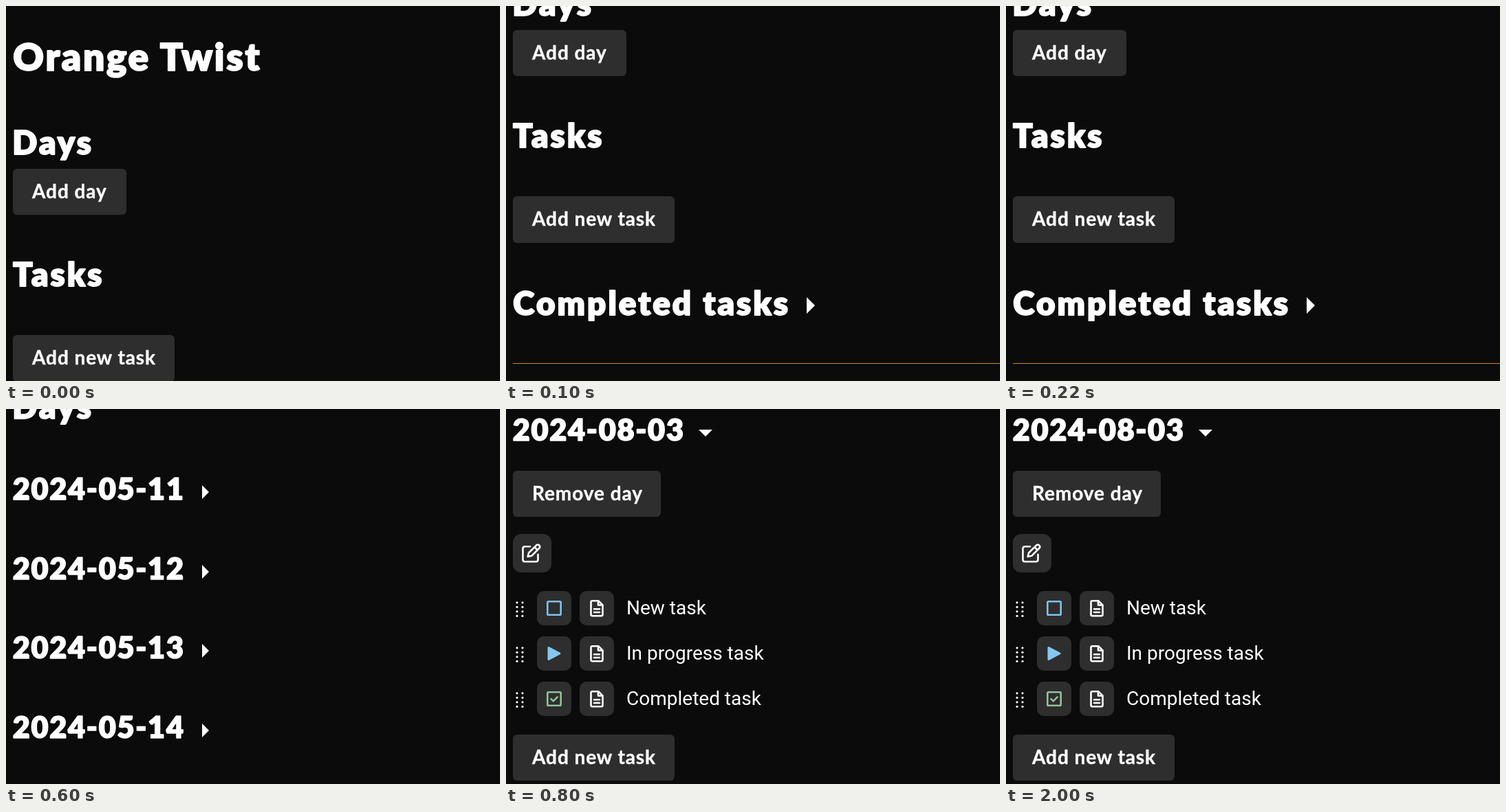
Recreate the animation shown at these times as an HTML page. Size 718 by 546 pixels, loop 2800 ms.

```html
<!DOCTYPE html>
<html lang="en">
<head>
<meta charset="utf-8">
<title>Task list</title>
<style>
  html, body { margin: 0; width: 100%; height: 100%; overflow: hidden; background: #0b0b0b; }
  svg { display: block; width: 718px; height: 546px; }
  text { fill: #fff; white-space: pre; }
  .h1, .h2, .h3 {
    font-family: Lato, sans-serif; font-weight: 900;
    stroke: #fff; stroke-width: 1.9px; stroke-linejoin: round;
  }
  .h1 { font-size: 55px; letter-spacing: .049em; }
  .h2 { font-size: 47.5px; letter-spacing: .064em; }
  .h3 { font-size: 43.2px; letter-spacing: .04em; stroke-width: 1.6px; }
  .label {
    font: 700 28px Lato, sans-serif; letter-spacing: .033em;
    stroke: #fff; stroke-width: .4px; stroke-linejoin: round;
  }
  .task { font: 400 28px Roboto, sans-serif; }
  .box { fill: #2e2e2e; }
  .solid { fill: #fff; }
  .line { fill: none; stroke: #fff; stroke-width: 2.6px; stroke-linecap: round; stroke-linejoin: round; }
  .blue { stroke: #7cc4f0; }
  .green { stroke: #93c19b; }
  #list, #day { opacity: 0; }
</style>
</head>
<body>
<svg viewBox="0 0 718 546">
  <g id="page"></g>
  <g id="day"></g>
</svg>
<script>
const LOOP = 2800;
const $ = id => document.getElementById(id);

const text = (cls, x, y, str) => `<text class="${cls}" x="${x}" y="${y}">${str}</text>`;
const box = (x, y, w, h, r) => `<rect class="box" x="${x}" y="${y}" width="${w}" height="${h}" rx="${r}"/>`;
const line = (d, color = '') => `<path class="line ${color}" d="${d}"/>`;
const button = (y, w, h, label) => box(10, y, w, h, 6) + text('label', 38, y + 42.5, label);
const arrowRight = (x, y, r) => `<path class="solid" d="M${x} ${y - r}l${r} ${r}l${-r} ${r}z"/>`;

const square = color => line('M61.6 280.3h16.8q1.3 0 1.3 1.3v16.8q0 1.3-1.3 1.3h-16.8q-1.3 0-1.3-1.3v-16.8q0-1.3 1.3-1.3z', color);
const status = {
  open: square('blue'),
  started: '<path d="M62 281.5v17l16-8.5z" fill="#84c7ef" stroke="#84c7ef" stroke-width="3" stroke-linejoin="round"/>',
  done: square('green') + line('M65.5 290.2l3.2 3.2 6-6', 'green'),
};
const sheet = line('M134.5 279.3h-9q-2 0-2 2v18q0 2 2 2h13q2 0 2-2v-14z')
  + line('M134 279.8v5.7h6M128 291.2h8M128 296h8');
const pencil = line('M35 200.3h-7.5q-3 0-3 3v16q0 3 3 3h16q3 0 3-3v-7.5')
  + line('M33 209.5l11.2-11.2q2-1.5 4 0 2 2 .3 4.2l-11.3 11.3-5.5 1.2zM41.5 201l4.3 4.3');

function grip() {
  let dots = '';
  for (const x of [16, 24])
    for (let i = 0; i < 4; i++)
      dots += `<circle class="solid" cx="${x}" cy="${281.8 + i * 6.5}" r="1.6"/>`;
  return dots;
}

const taskRow = (i, icon, name) => `<g transform="translate(0 ${i * 66})">`
  + grip() + box(45, 265, 50, 50, 10) + box(107, 265, 50, 50, 10)
  + icon + sheet + text('task', 175, 299, name) + '</g>';

const dateRow = (date, i) => {
  const y = 334 + i * 115.6;
  return text('h3', 9.7, y, date) + arrowRight(285, Math.round(y - 11), 10);
};

$('page').innerHTML = text('h2', 9.3, 216, 'Days')
  + '<g id="home">'
  + text('h1', 10.3, 93.5, 'Orange Twist')
  + button(237, 165, 67, 'Add day')
  + text('h2', 10, 408, 'Tasks')
  + button(479, 235, 68, 'Add new task')
  + text('h2', 10.3, 651.5, 'Completed tasks')
  + arrowRight(437, 638, 12)
  + '<rect x="10" y="722" width="708" height="1" fill="#c68a12"/>'
  + '</g><g id="list">'
  + ['2024-05-11', '2024-05-12', '2024-05-13', '2024-05-14'].map(dateRow).join('')
  + '</g>';

$('day').innerHTML = text('h3', 9.7, 46, '2024-08-03')
  + '<path class="solid" d="M280 30h20l-10 10z"/>'
  + button(90, 215, 67, 'Remove day')
  + box(10, 182, 56, 56, 12) + pencil
  + taskRow(0, status.open, 'New task')
  + taskRow(1, status.started, 'In progress task')
  + taskRow(2, status.done, 'Completed task')
  + button(474, 235, 67, 'Add new task');

const start = document.timeline.currentTime || 0;

// Each step holds its value until the next listed time.
function hold(id, prop, steps) {
  const frames = steps.map(([ms, value]) => ({ offset: ms / LOOP, [prop]: value, easing: 'step-end' }));
  frames.push({ ...frames.at(-1), offset: 1 });
  $(id).animate(frames, { duration: LOOP, iterations: Infinity }).startTime = start;
}

hold('page', 'transform', [[0, 'translateY(0px)'], [100, 'translateY(-202px)']]);
hold('page', 'opacity', [[0, 1], [800, 0]]);
hold('home', 'opacity', [[0, 1], [300, 0]]);
hold('list', 'opacity', [[0, 0], [300, 1], [800, 0]]);
hold('day', 'opacity', [[0, 0], [800, 1]]);
</script>
</body>
</html>
```
